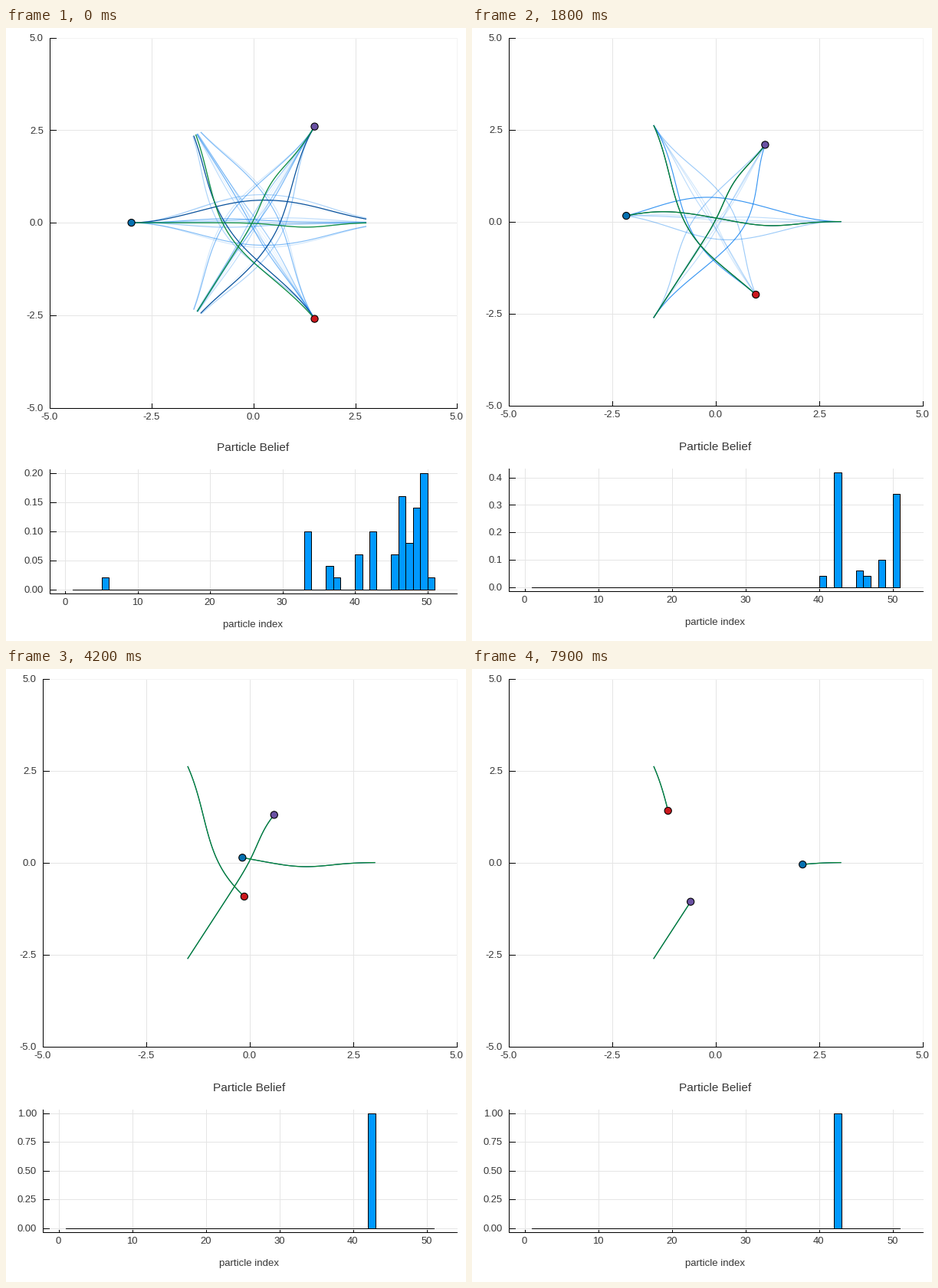
These frames come from a looping animation (600 px wide and 800 px high, 8000 ms). A matplotlib script:

```python
import matplotlib.pyplot as plt
import numpy as np
from matplotlib.animation import FuncAnimation

FRAMES, STEP = 80, 100
PX = 0.72  # points per pixel at 100 dpi
TOP, RIGHT = 12, 588
TEXT, GRID = "#363636", "#e5e5e5"
LIGHT, NAVY, GREEN = (0.06, 0.5, 0.94), "#08519c", "#088c2c"
TOTAL, LEADER, RUNNER_UP = 50, 42, 50

plt.rcParams["font.family"] = "Liberation Sans"
fig = plt.figure(figsize=(6, 8), dpi=100, facecolor="white")
ax = fig.add_axes([0, 0, 1, 1])

# Rival particles: sideways bulge, starting count, lifetime in s, early gain.
RIVALS = {
    5: (0.03, 1, 0.4, 0), 33: (-0.1, 5, 0.6, 0), 36: (-0.66, 2, 1.6, 6),
    37: (-0.03, 1, 0.5, 0), 40: (0.02, 3, 2.9, 1), 45: (0.1, 3, 2.5, 4),
    46: (0.08, 8, 2.4, 0), 47: (0.75, 4, 1.5, 0), 48: (-0.6, 7, 2.8, 1.8),
    49: (0.6, 10, 0.7, 0),
}
BULGE = {i: r[0] for i, r in RIVALS.items()} | {RUNNER_UP: 0.65}

# Agents cross a circle of radius 3: start angle, colour, distance covered at
# TIMES, and the humps of the path as (height, centre, width, rise time).
TIMES = [0, 0.7, 1.8, 3.3, 5.3, 6.8, 7.9]
AGENTS = [
    (180, "#0570b0", [0, 0.22, 0.83, 2.03, 3.71, 4.57, 5.09],
     [(0.27, -1.3, 1.4, 1.8), (-0.12, 1.3, 0.95, 0)]),
    (60, "#6a51a3", [0, 0.15, 0.6, 1.23, 2.12, 3.26, 4.23],
     [(-0.16, -1.15, 0.9, 0)]),
    (300, "#cb181d", [0, 0.2, 0.8, 1.69, 3.02, 4.11, 4.8],
     [(0.68, 0.05, 2, 0)]),
]


def spline(xs, ys, x):
    """Smooth curve through a few key points."""
    xs, ys = np.asarray(xs, float), np.asarray(ys, float)
    m = np.gradient(ys, xs)
    i = np.clip(np.searchsorted(xs, x, "right") - 1, 0, len(xs) - 2)
    h = xs[i + 1] - xs[i]
    u = (x - xs[i]) / h
    return ((1 + 2 * u) * (1 - u) ** 2 * ys[i] + u * (1 - u) ** 2 * h * m[i]
            + u * u * (3 - 2 * u) * ys[i + 1] + u * u * (u - 1) * h * m[i + 1])


def decay(t, life, gain):
    u = min(1, t / life)
    return (1 - u) * (1 + gain * u)


def counts_at(t):
    """Rivals die out; the two front runners share what they leave."""
    counts = {i: int(n * decay(t, life, gain) + 0.5)
              for i, (_, n, life, gain) in RIVALS.items()}
    pool = TOTAL - sum(counts.values())
    share = 0.8 * decay(t, 3.63, 0.28) * min(1, 0.2 + 2 * t)
    counts[RUNNER_UP] = int(pool * share + 0.5)
    counts[LEADER] = pool - counts[RUNNER_UP]
    return {i: n for i, n in sorted(counts.items()) if n}


def true_path(humps, x, t):
    y = sum(h * np.exp(-((x - c) / w) ** 2) * (min(1, t / rise) if rise else 1)
            for h, c, w, rise in humps)
    return y * (1 - (x / 3) ** 6)


def rival_path(i, x, t, loose):
    bulge = BULGE[i] * (1 - 0.1 * min(t, 2) * (BULGE[i] < 0))
    sway = 0.06 if i % 2 else -0.06
    hump = np.cos(np.pi * x / np.where(x < 0, 6, 6 + 1.5 * loose)) ** 2
    return hump * (bulge + sway * np.sin(np.pi * x / 3))


def anchored(x, y, y0, reach):
    """Bend a path so that it leaves from the agent's own position."""
    u = np.clip((x - x[0]) / reach, 0, 1)
    return y + (y0 - y[0]) * (1 + np.cos(np.pi * u)) / 2


def line(xs, ys, color="black", width=1.0, z=1, **kw):
    ax.plot(xs, ys, color=color, lw=width * PX, zorder=z, **kw)


def label(x, y, s, size=13, ha="center"):
    ax.text(x, y, s, fontsize=size * PX, color=TEXT, ha=ha, va="baseline", zorder=9)


def y_tick(left, y, s, color=GRID):
    line([left, RIGHT], [y, y], color, z=0)
    line([left, left + 8], [y, y])
    label(left - 8.5, y + 4.2, s, ha="right")


def x_tick(x, top, bottom, size, s, color=GRID):
    line([x, x], [top, bottom], color, z=0)
    line([x, x], [bottom, bottom - size])
    label(x - 0.5, bottom + 15.6, s)


def frame_lines(left, top, bottom):
    line([left, left, RIGHT], [top, bottom, bottom])


def draw_field(left, bottom):
    for k, v in enumerate(np.arange(-5, 5.1, 2.5)):
        color = "#f3f3f3" if k == 4 else GRID
        x_tick(left + k / 4 * (RIGHT - left), TOP, bottom, 6, f"{v:.1f}", color)
        y_tick(left, bottom - k / 4 * (bottom - TOP), f"{v:.1f}", color)
    frame_lines(left, TOP, bottom)


def draw_belief(left, top, bottom, counts):
    pad = 0.03 / 1.06 * (bottom - top)
    zero, high = round(bottom - pad), round(top + pad)
    peak = max(counts.values()) / TOTAL
    scale = (zero - high) / peak
    step = 0.05 if peak < 0.29 else 0.1 if peak < 0.57 else 0.2 if peak < 0.99 else 0.25
    digits = 2 if step in (0.05, 0.25) else 1
    unit = (RIGHT - left) / 56.24

    def at(i):
        return left + (i + 2.12) * unit

    for i in range(0, 51, 10):
        x_tick(at(i), top, bottom, 2.5, str(i))
    for v in np.arange(0, peak + 1e-6, step):
        y_tick(left, zero - v * scale, f"{v:.{digits}f}")
    frame_lines(left, top, bottom)
    line([at(1), at(51)], [zero, zero], z=3)
    for i, n in counts.items():
        ax.add_patch(plt.Rectangle((at(i), zero), unit, -n / TOTAL * scale,
                                   fc="#0099ff", ec="black", lw=PX, zorder=2))
    middle = (left + RIGHT) / 2 - 1
    label(middle, top - 24, "Particle Belief", 15.4)
    label(middle, bottom + 44.5, "particle index", 13.3)


def draw_agent(agent, left, bottom, t, counts):
    angle, color, covered, humps = agent
    a = np.radians(angle)
    cx, cy = (left + RIGHT) / 2, (TOP + bottom) / 2
    sx, sy = (RIGHT - left) / 10, (bottom - TOP) / 10

    def to_px(x, y):
        return (cx + sx * (np.sin(a) * y - np.cos(a) * x),
                cy + sy * (np.sin(a) * x + np.cos(a) * y))

    x0 = spline(TIMES, covered, t) - 3
    y0 = true_path(humps, x0, TIMES[-1])
    loose = max(0, 1 - t / 0.3)  # first plans stop short of the goal
    x = np.linspace(x0, 3.01 - 0.25 * loose, 90)
    truth = true_path(humps, x, t)
    best = max(counts, key=counts.get)
    for i, n in counts.items():
        y = truth if i == LEADER else rival_path(i, x, t, loose)
        xy = to_px(x, anchored(x, y, y0, 2.6))
        if i == best:
            line(*xy, NAVY, 1.25, z=5)
        else:
            line(*xy, LIGHT, 1.15, z=4, alpha=1 - 0.9 ** n)
    line(*to_px(x, anchored(x, truth, y0, 1.2)), GREEN, 1.25, z=6, alpha=0.92)
    ax.add_patch(plt.Circle(to_px(x0, y0), 4.6, fc=color, ec="black",
                            lw=1.1 * PX, zorder=8))


def draw(frame):
    t = frame * STEP / 1000
    ax.clear()
    ax.set_axis_off()
    # Offsets make whole coordinates fall on pixel centres after snapping.
    ax.set_xlim(-0.4, 599.6)
    ax.set_ylim(799.4, -0.6)
    left, bottom, top2, bottom2 = (57, 495, 575, 737) if frame == 0 else (48, 492, 574, 734)
    counts = counts_at(t)
    draw_field(left, bottom)
    draw_belief(left, top2, bottom2, counts)
    for agent in AGENTS:
        draw_agent(agent, left, bottom, t, counts)
    return []


anim = FuncAnimation(fig, draw, frames=FRAMES, interval=STEP, init_func=lambda: [],
                     repeat=True, repeat_delay=0, blit=False)
plt.show()
```
